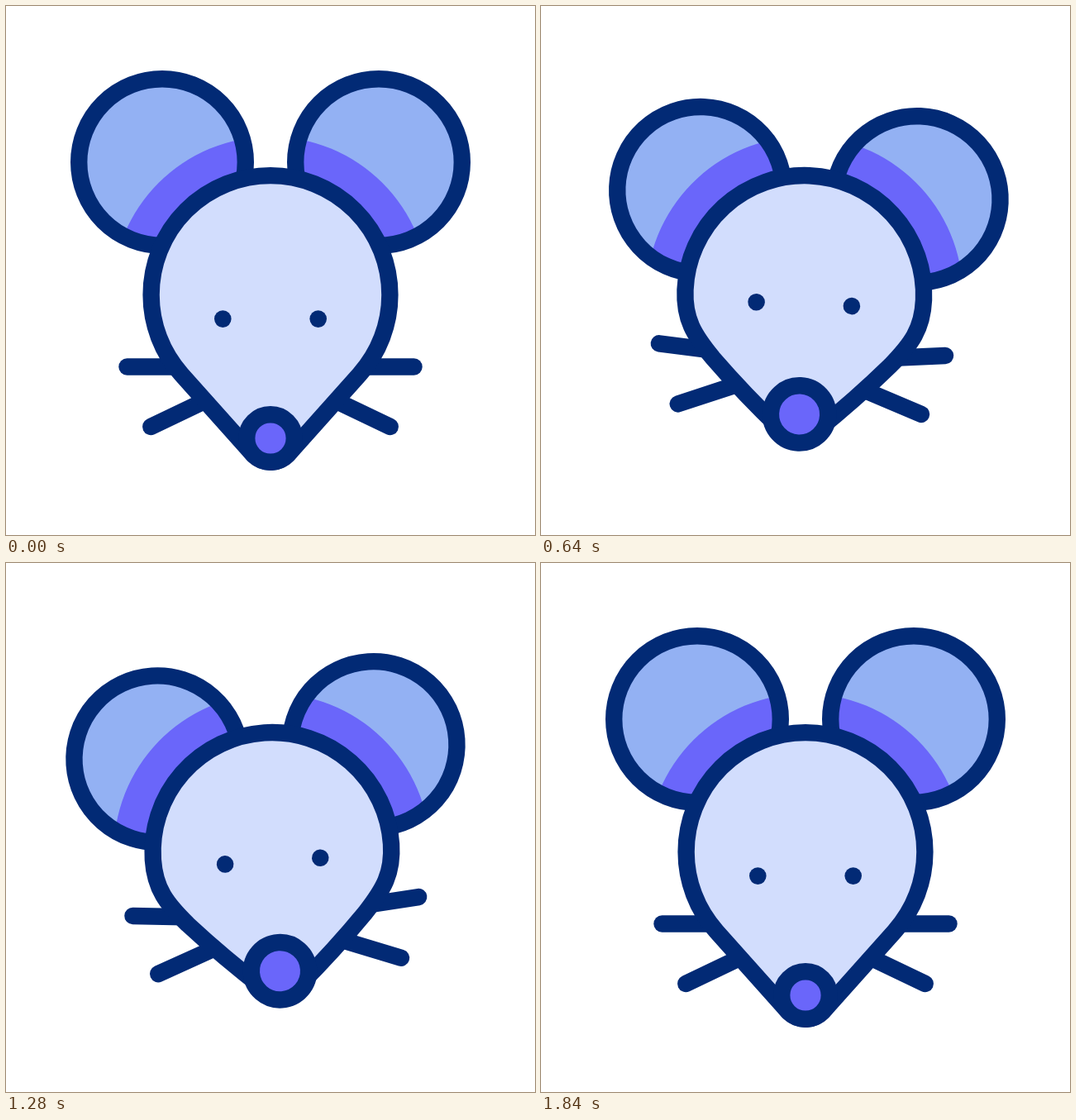
Write an HTML page with a canvas that moves like this. It is 640 px wide and 640 px high and loops after 2000 ms.

```html
<!DOCTYPE html>
<html lang="en">
<head>
<meta charset="utf-8">
<title>Mouse</title>
<style>
html, body { margin: 0; width: 100%; height: 100%; overflow: hidden; background: #fff; }
canvas { display: block; width: 100vw; height: 100vh; }
</style>
</head>
<body>
<canvas width="640" height="640"></canvas>
<script>
const ctx = document.querySelector('canvas').getContext('2d');
const NAVY = '#022a75', EAR = '#93b1f3', PURPLE = '#6a66fa', FACE = '#d2ddfd';
const LOOP = 2000, STEP = 40, RAD = Math.PI / 180;
const HEAD_Y = 29.5, HEAD_R = 144.4, NOSE_Y = 203, NOSE_R = 28.8;

// Keys are [time, value] pairs, eased in and out between neighbours.
function ease(keys, t) {
  if (t <= keys[0][0]) return keys[0][1];
  for (let i = 1; i < keys.length; i++) {
    const [t0, a] = keys[i - 1], [t1, b] = keys[i];
    if (t < t1) {
      const u = (t - t0) / (t1 - t0);
      return a + (b - a) * u * u * (3 - 2 * u);
    }
  }
  return keys[keys.length - 1][1];
}

const LIFT = [[100, 0], [660, 1], [1260, 1], [1820, 0]];
const TILT = [[540, 0], [840, 9.4], [1120, -8.4], [1420, 0]];
const SNIFF = [[100, 1], [660, 1.205], [950, 1], [1260, 1.205], [1820, 1]];

function circle(x, y, r) {
  ctx.beginPath();
  ctx.arc(x, y, r, 0, 2 * Math.PI);
}

function fill(color) {
  ctx.fillStyle = color;
  ctx.fill();
}

function bothSides(draw) {
  for (const side of [1, -1]) {
    ctx.save();
    ctx.scale(side, 1);
    draw();
    ctx.restore();
  }
}

function ear(lift) {
  const y = -131 + 39.5 * lift;
  ctx.save();
  circle(-131, y, 100.8);
  fill(EAR);
  ctx.clip();
  circle(0, HEAD_Y, 191.5);
  fill(PURPLE);
  ctx.restore();
  circle(-131, y, 100.8);
  ctx.stroke();
}

// A whisker turns about its inner end (x, y).
function whisker(x, y, dx, dy, lift) {
  ctx.save();
  ctx.translate(x, y - 15.5 * lift);
  ctx.rotate(5 * RAD * lift);
  ctx.beginPath();
  ctx.moveTo(0, 0);
  ctx.lineTo(dx, dy);
  ctx.stroke();
  ctx.restore();
}

function head(lift) {
  const sin = (HEAD_R - NOSE_R) / (NOSE_Y - HEAD_Y), cos = Math.sqrt(1 - sin * sin);
  const handle = 35.5, angle = Math.asin(sin);
  const sx = HEAD_R * cos, sy = HEAD_Y + HEAD_R * sin - 15.5 * lift;
  const noseY = NOSE_Y - 29 * lift;
  const tx = NOSE_R * cos, ty = noseY + NOSE_R * sin;
  const mx = (sx + tx) / 2 + 2 * lift, my = (sy + ty) / 2 + 2 * lift;
  const hx = sx + handle * sin, hy = sy - handle * cos;

  ctx.beginPath();
  ctx.arc(0, HEAD_Y, HEAD_R, Math.PI, 0);
  ctx.bezierCurveTo(HEAD_R, HEAD_Y + handle, hx, hy, sx, sy);
  ctx.quadraticCurveTo(mx, my, tx, ty);
  ctx.arc(0, noseY, NOSE_R, angle, Math.PI - angle);
  ctx.quadraticCurveTo(-mx, my, -sx, sy);
  ctx.bezierCurveTo(-hx, hy, -HEAD_R, HEAD_Y + handle, -HEAD_R, HEAD_Y);
  ctx.closePath();
  fill(FACE);
  ctx.stroke();
}

function draw(t) {
  const lift = ease(LIFT, t);
  ctx.fillStyle = '#fff';
  ctx.fillRect(0, 0, 640, 640);
  ctx.save();
  ctx.translate(320, 320);
  ctx.rotate(ease(TILT, t) * RAD);
  ctx.strokeStyle = NAVY;
  ctx.lineWidth = 20.4;
  ctx.lineCap = ctx.lineJoin = 'round';

  bothSides(() => {
    ear(lift);
    whisker(-112, 116.5, -61.5, 0, lift);
    whisker(-80, 158, -64.8, 31, lift);
  });
  head(lift);
  bothSides(() => {
    circle(-57.7, 58.6 - 18 * lift, 10.3);
    fill(NAVY);
  });
  circle(0, NOSE_Y - 29 * lift, NOSE_R * ease(SNIFF, t));
  fill(PURPLE);
  ctx.stroke();
  ctx.restore();
}

const start = performance.now();
function tick() {
  const t = (performance.now() - start) % LOOP;
  draw(Math.floor(t / STEP) * STEP);
  requestAnimationFrame(tick);
}
tick();
</script>
</body>
</html>
```
